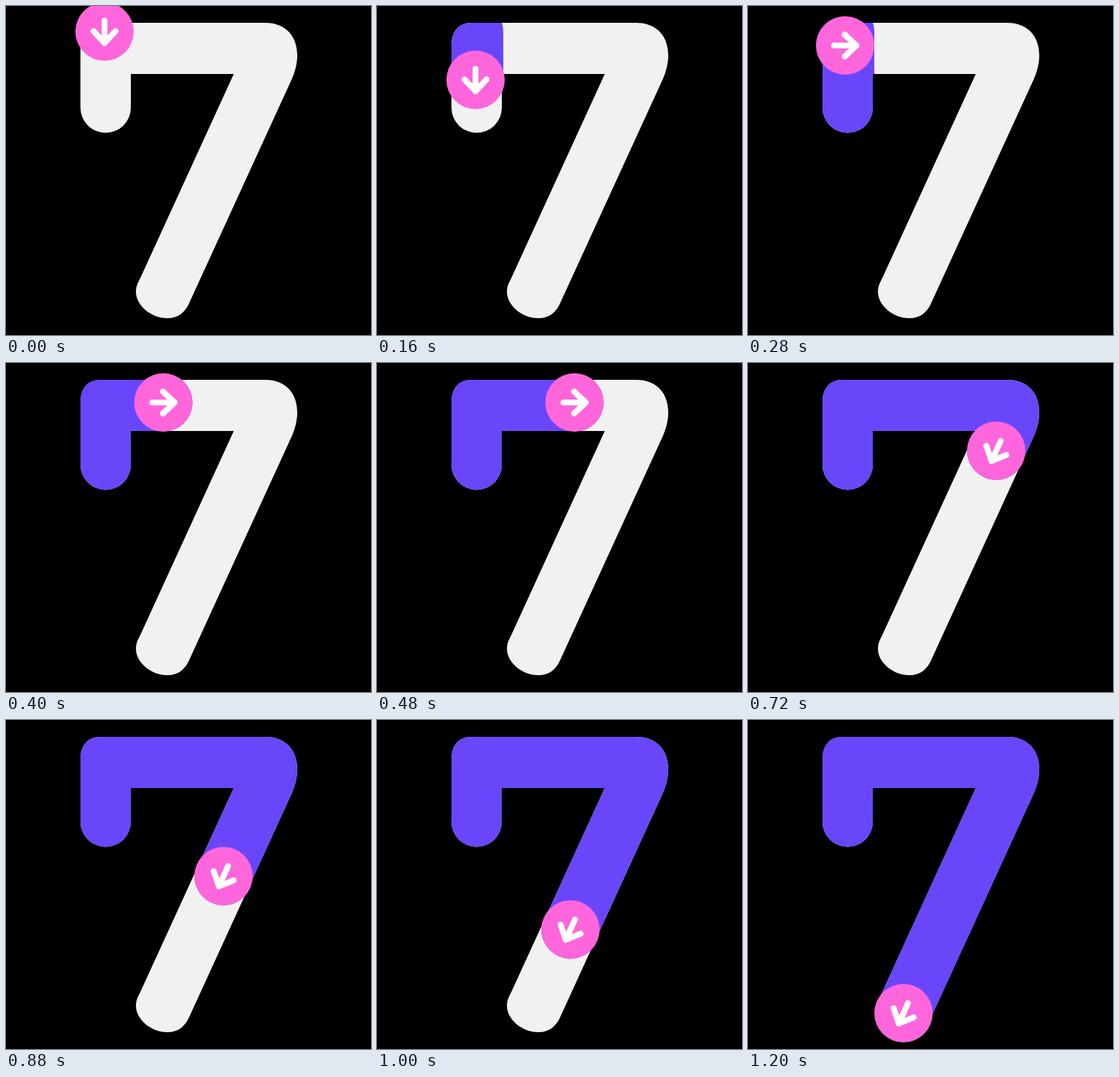
An HTML page with a canvas that plays this animation: 500 by 450 pixels, repeating every 3000 ms.

```html
<!DOCTYPE html>
<html lang="en">
<head>
<meta charset="utf-8">
<title>Tracing the digit seven</title>
<style>
  html, body { margin: 0; width: 100%; height: 100%; overflow: hidden; background: #000; }
  canvas { display: block; }
</style>
</head>
<body>
<canvas id="stage" width="500" height="450"></canvas>
<script>
const ctx = document.getElementById('stage').getContext('2d');
const LOOP = 3000, STEP = 40, LAST = 30;
const GREY = '#f1f1f1', PURPLE = '#6946fa', PINK = '#ff66dc';

const seven = new Path2D(`M102 55 C102 34 112 23 130 23 H355
  C384 23 399 42 399 68 C399 78 396 90 392 99 L252 404
  C246 419 236 427 221 427 C198 427 178 409 178 391 C178 383 181 378 184 372
  L312 93 H171 V139 A34.5 34.5 0 0 1 102 139 Z`);

// Each stroke: wake width and [step, x, y] keys.
const stem = { width: 76, keys: [[0, 135, 35], [6, 135, 134]] };
const hook = { width: 80, keys: [
  [7, 133, 54], [12, 270.5, 54], [14, 327.5, 54], [15, 356, 54], [16, 364, 67],
  [18, 340, 120], [22, 298, 213.5], [25, 265, 286.5], [28, 226.5, 370.5],
  [29, 215.5, 395], [30, 213, 401]
] };
const DOWN = Math.PI / 2, RIGHT = 0, SLANT = Math.atan2(281, -127);

// Points passed up to the given step, ending at the current position.
function trail(keys, step) {
  const points = [keys[0].slice(1)];
  for (let i = 1; i < keys.length && keys[i - 1][0] < step; i++) {
    const [s0, x0, y0] = keys[i - 1], [s1, x1, y1] = keys[i];
    const k = Math.min(1, (step - s0) / (s1 - s0));
    points.push([x0 + (x1 - x0) * k, y0 + (y1 - y0) * k]);
  }
  return points;
}

function polyline(points) {
  ctx.beginPath();
  points.forEach(([x, y]) => ctx.lineTo(x, y));
  ctx.stroke();
}

function drawWake(stroke, step) {
  const points = trail(stroke.keys, step);
  ctx.lineWidth = stroke.width;
  ctx.strokeStyle = PURPLE;
  if (points.length > 1) polyline(points);
  return points[points.length - 1];
}

function drawMarker([x, y], angle) {
  ctx.save();
  ctx.translate(x, y);
  ctx.fillStyle = PINK;
  ctx.beginPath();
  ctx.arc(0, 0, 40, 0, Math.PI * 2);
  ctx.fill();
  ctx.rotate(angle);
  ctx.strokeStyle = '#fff';
  ctx.lineWidth = 8;
  polyline([[-15, 0], [15, 0]]);
  polyline([[-0.5, -15], [15.5, 0], [-0.5, 15]]);
  ctx.restore();
}

function draw(time) {
  const step = Math.min(LAST, Math.floor(time / STEP));
  ctx.fillStyle = '#000';
  ctx.fillRect(0, 0, 500, 450);
  ctx.lineCap = ctx.lineJoin = 'round';
  ctx.fillStyle = GREY;
  ctx.fill(seven);

  ctx.save();
  ctx.clip(seven);
  let tip = drawWake(stem, step);
  if (step >= 7) {
    polyline([[136, 100], [136, 138]]);
    tip = drawWake(hook, step);
  }
  if (step === LAST) {
    ctx.fillStyle = PURPLE;
    ctx.fill(seven);
  }
  ctx.restore();

  drawMarker(tip, step < 7 ? DOWN : step < 16 ? RIGHT : SLANT);
}

const start = performance.now();
function tick() {
  draw((performance.now() - start) % LOOP);
  requestAnimationFrame(tick);
}
tick();
</script>
</body>
</html>
```
